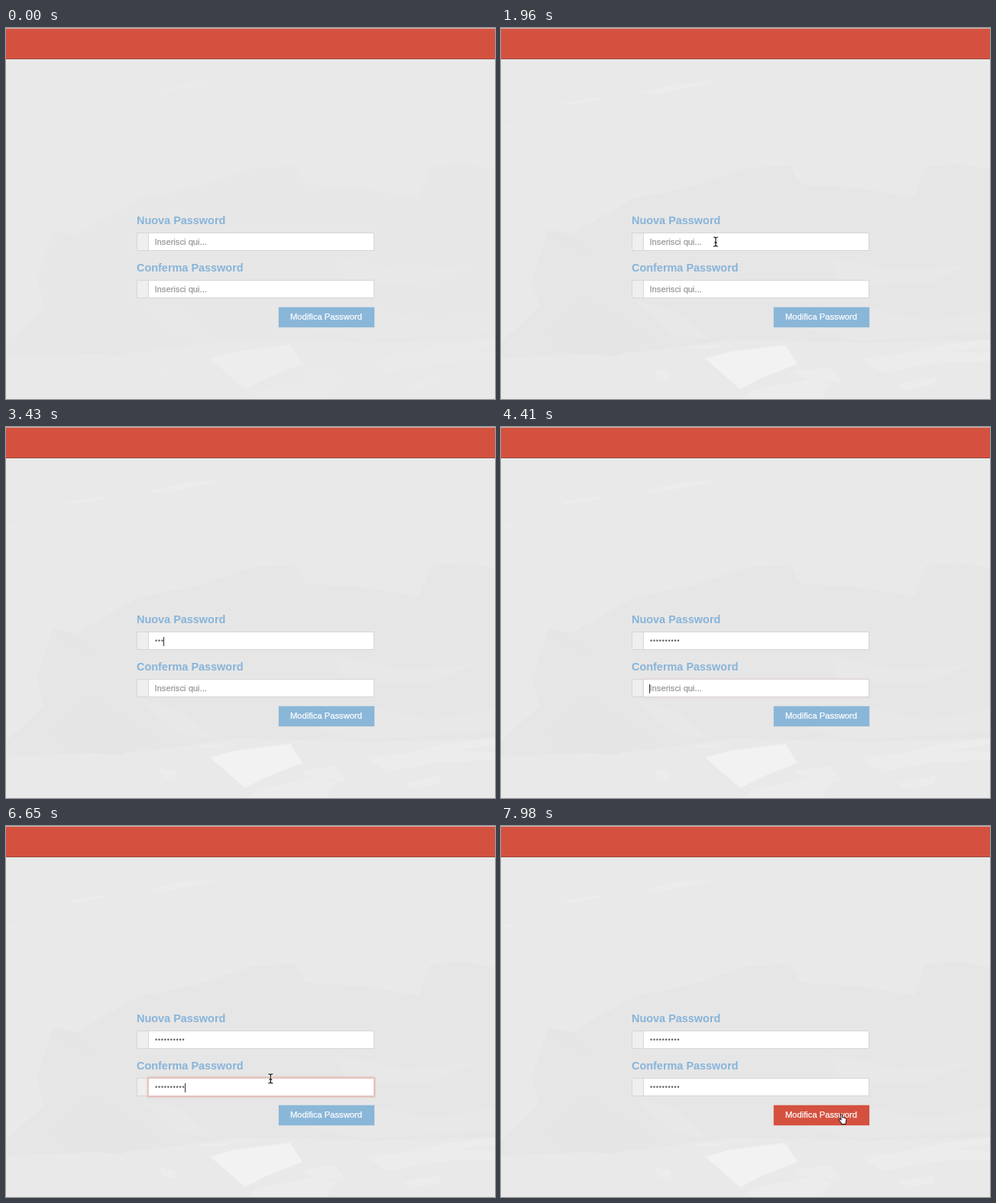
Recreate the animation shown at these times as an HTML page. Size 640x486 px, loop 8000 ms.

```html
<!DOCTYPE html>
<html lang="it">
<head>
<meta charset="utf-8">
<title>Modifica Password</title>
<style>
html, body { margin: 0; width: 100%; height: 100%; overflow: hidden; background: #e9e9e9; }
svg { display: block; width: 640px; height: 486px; }
text { font: 11.2px "Liberation Sans", Arial, sans-serif; stroke-width: .25; }
.label { font-size: 14.45px; font-weight: bold; fill: #87b4d9; }
.hint { fill: #999; stroke: #999; }
.caret { fill: #333; }
</style>
</head>
<body>
<svg viewBox="0 0 640 486">
  <defs>
    <filter id="blur" x="-10%" y="-60%" width="120%" height="220%"><feGaussianBlur stdDeviation="1.3"/></filter>
    <path id="beam" d="M-2.5-6Q0-6 0-4.5Q0-6 2.5-6M0-4.5V4.5M-2.5 6Q0 6 0 4.5Q0 6 2.5 6M-1.5 1H1.5"/>
  </defs>
  <rect width="640" height="486" fill="#e9e9e9"/>
  <g id="paint">
    <path fill="#e6e6e6" d="M0 412 50 365 40 330 62 264 92 270 130 248 175 223 250 208 320 184 378 180 392 205 470 210 540 222 556 181 600 178 640 185V408L480 412 300 408 180 425 0 432Z"/>
    <path fill="#e5e5e5" d="M74 266 116 294 112 300 70 276ZM60 400 110 350 200 408 150 430 78 424Z"/>
    <path fill="#e8e8e8" d="M430 300 520 318 612 311 560 334 446 338ZM175 356 230 372 272 408 225 402ZM400 395 480 368 560 384 640 370V398L470 410Z"/>
    <path fill="#f2f2f2" d="M267 433 300 424 372 415 388 440 340 459 313 473Z"/>
    <path fill="#ececec" d="M184 84 230 74 280 69 262 75 200 87ZM80 98 130 91 128 94 84 101ZM0 131 24 128 12 132ZM246 417 300 415 270 421ZM470 433 520 428 580 415 640 408V416L590 424 640 426V436L560 440 500 452ZM384 450 430 444 446 465 396 458ZM200 447 222 451 220 462 206 460ZM520 466 570 457 566 468 528 474ZM330 474 410 459 432 466 420 486H316Z"/>
  </g>
  <rect width="640" height="40" fill="#d4513f"/>
  <rect width="640" height="1" fill="#d9b5ae"/>
  <rect y="40" width="640" height="1" fill="#9c4b40"/>
  <g id="form"></g>
  <rect id="button" x="356.8" y="365.7" width="125.4" height="26.5"/>
  <text x="372" y="382" fill="#fff" stroke="#fff">Modifica Password</text>
  <g id="ibeam" fill="none" stroke-linecap="round">
    <use href="#beam" stroke="#fff" stroke-width="2.6"/>
    <use href="#beam" stroke="#111" stroke-width="1.2"/>
  </g>
  <path id="arrow" fill="#111" stroke="#fff" stroke-width=".8" d="M0 0V11L2.5 8.8 4.3 12.8 6.2 12 4.5 8.1H8Z"/>
  <path id="hand" fill="#fff" stroke="#111" stroke-linejoin="round" d="M-2.6-6.2Q-1.7-7.2-.8-6.2L0-2 1.4-2.3 2.2-1.6 3.4-1.8 4-.8Q5.3-.8 5.1.6L4.3 4.2V6.5H-1.6V5L-4.8 1Q-4.8-.4-3.3 0L-1.8 1.3Z"/>
</svg>
<script>
const LOOP = 8000, STEP = 70, PITCH = 3.93;
const $ = id => document.getElementById(id);

// keys: times at which each character appears; focus: [start, end]
const fields = [
  { label: 'Nuova Password', y: 268, focus: [2170, 4340], glow: false,
    keys: [3010, 3220, 3360, 3500, 3570, 3710, 3780, 3920, 4060, 4200] },
  { label: 'Conferma Password', y: 330, focus: [4340, 6950], glow: true,
    keys: [5390, 5530, 5670, 5810, 5880, 6020, 6090, 6230, 6300, 6440] }
];

// Pointer waypoints: time, x, y
const path = [[70, 430, 130], [840, 290, 275], [1330, 290, 275], [1960, 281, 280],
  [6440, 281, 280], [6950, 458, 418], [7350, 458, 418], [7910, 447, 384]];

for (const f of fields) {
  const g = document.createElementNS('http://www.w3.org/2000/svg', 'g');
  g.setAttribute('transform', `translate(0 ${f.y})`);
  g.innerHTML = `
    <text class="label" x="171" y="-11">${f.label}</text>
    <path fill="#efefef" stroke="#d6d6d6" d="M171.5.5H187V23.5H171.5Z"/>
    <g class="glow"><rect x="185" y="-1" width="298" height="26" fill="#dc6f60" opacity=".5" filter="url(#blur)"/></g>
    <rect x="186.5" y=".5" width="295" height="23" fill="#fff" stroke="#d6d6d6"/>
    <rect class="glow" x="186.5" y=".5" width="295" height="23" fill="none" stroke="#e8c8c4"/>
    <text class="hint" x="194.5" y="16">Inserisci qui...</text>
    <g class="dots" fill="#666">${f.keys.map((_, i) =>
      `<circle cx="${196.6 + i * PITCH}" cy="11.7" r="1.3"/>`).join('')}</g>
    <rect class="caret" y="7" width="1" height="12"/>`;
  $('form').append(g);
  f.glows = g.querySelectorAll('.glow');
  f.hint = g.querySelector('.hint');
  f.dots = g.querySelector('.dots').children;
  f.caret = g.querySelector('.caret');
}

const clamp = v => Math.max(0, Math.min(1, v));
const ramp = (t, from, length) => clamp((t - from) / length);
const ease = p => p * p * (3 - 2 * p);
const show = (el, on) => el.setAttribute('opacity', Number(on));

function pointerAt(t) {
  let i = 0;
  while (i < path.length - 2 && t >= path[i + 1][0]) i++;
  const [a, b] = [path[i], path[i + 1]];
  const p = ease(ramp(t, a[0], b[0] - a[0]));
  return [a[1] + (b[1] - a[1]) * p, a[2] + (b[2] - a[2]) * p];
}

function drawField(f, t) {
  const [start, end] = f.focus;
  const count = f.keys.filter(k => t >= k).length;
  const glow = f.glow ? ramp(t, start, 420) * (1 - ramp(t, end, 350)) : 0;
  f.glows.forEach(el => show(el, glow));
  show(f.hint, !count);
  [...f.dots].forEach((dot, i) => show(dot, i < count));
  show(f.caret, t >= start && t < end);
  f.caret.setAttribute('x', Math.round(194.4 + count * PITCH));
}

function drawPointer(t) {
  const [x, y] = pointerAt(t);
  const visible = t >= 70 && (t < 3010 || t >= 6440);
  const inField = x > 187 && x < 481 && fields.some(f => y > f.y && y < f.y + 24);
  const onButton = x > 357 && x < 482 && y > 366 && y < 392 && t > 7350;
  const kind = onButton ? 'hand' : inField ? 'ibeam' : 'arrow';
  for (const id of ['arrow', 'ibeam', 'hand']) {
    show($(id), visible && id === kind);
    $(id).setAttribute('transform', `translate(${x} ${y})`);
  }
}

function draw(time) {
  const t = Math.floor(time % LOOP / STEP) * STEP;
  show($('paint'), t < 70 ? 0.55 : 1);
  fields.forEach(f => drawField(f, t));
  const hover = ramp(t, 7630, 210);
  const mix = (a, b) => Math.round(a + (b - a) * hover);
  $('button').setAttribute('fill', `rgb(${mix(138, 212)},${mix(182, 81)},${mix(216, 63)})`);
  drawPointer(t);
}

const began = performance.now();
function frame() {
  draw(performance.now() - began);
  requestAnimationFrame(frame);
}
frame();
</script>
</body>
</html>
```
